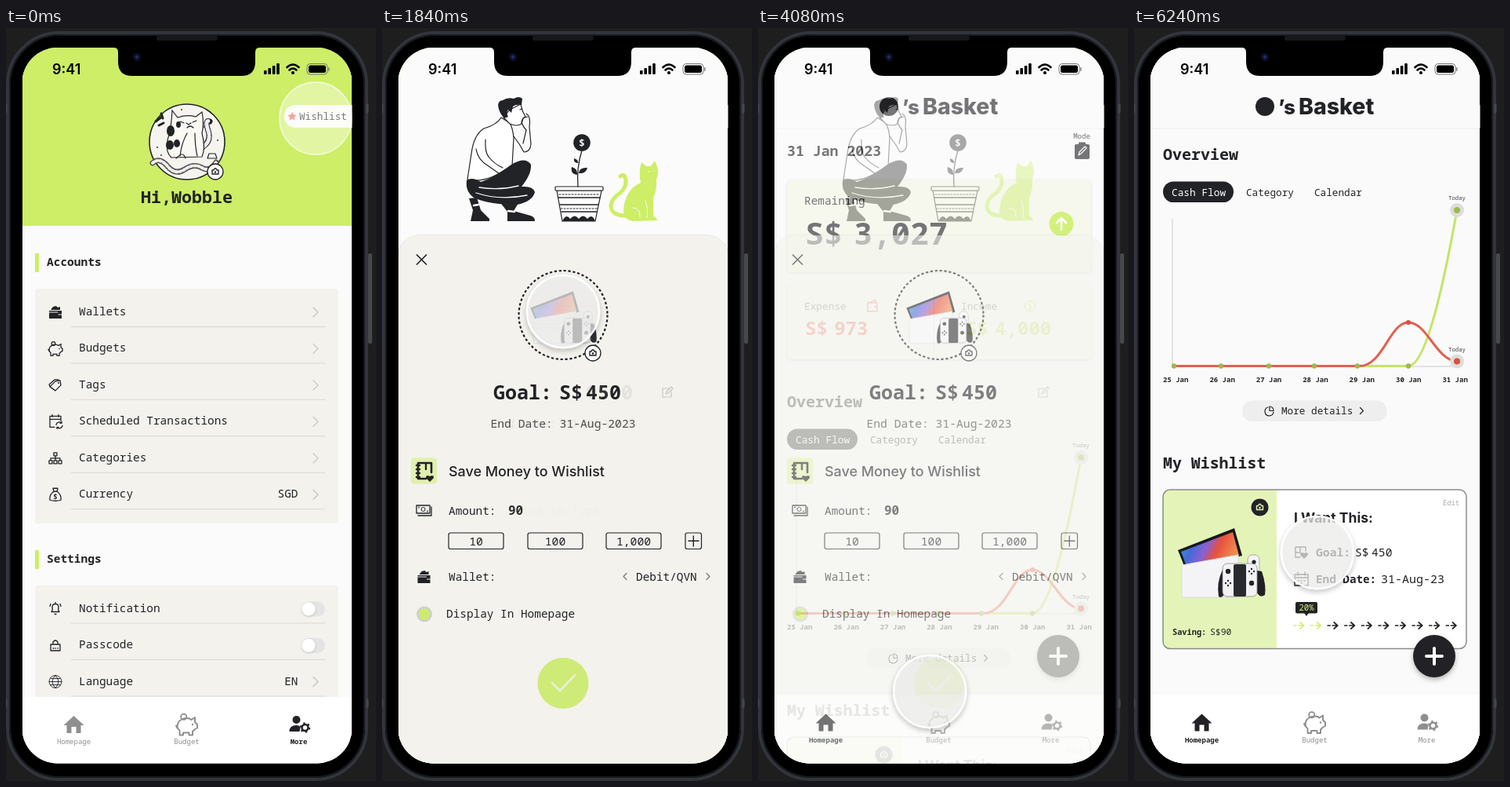
Write an HTML page that moves like this. It is 472 px wide and 959 px high and loops after 6.32 s.

```html
<!DOCTYPE html>
<html lang="en">
<head>
<meta charset="utf-8">
<title>Wishlist flow</title>
<style>
html,body{margin:0;width:100%;height:100%;overflow:hidden;background:#1e1e1f}
svg{display:block;width:472px;height:959px}
text{font-family:"Noto Sans Mono","Liberation Mono",monospace;white-space:pre}
.sans{font-family:Inter,"Open Sans",sans-serif}
</style>
</head>
<body>
<svg id="stage" viewBox="0 0 472 959" xmlns="http://www.w3.org/2000/svg"></svg>
<script>
const INK = '#222326', LIME = '#cdee66', PAPER = '#f3f2ec', GREY = '#8f8f8f';

// drawing helpers
const text = (x, y, s, size, {w = 400, c = INK, a = 'start', cls = ''} = {}) =>
  `<text x="${x}" y="${y}" font-size="${size}" font-weight="${w}" fill="${c}" text-anchor="${a}" class="${cls}">${s}</text>`;
const rect = (x, y, w, h, fill, r = 0, more = '') =>
  `<rect x="${x}" y="${y}" width="${w}" height="${h}" rx="${r}" fill="${fill}" ${more}/>`;
const dot = (x, y, r, fill, more = '') =>
  `<circle cx="${x}" cy="${y}" r="${r}" fill="${fill}" ${more}/>`;
const line = (d, c = INK, w = 1.3, more = '') =>
  `<path d="${d}" fill="none" stroke="${c}" stroke-width="${w}" stroke-linecap="round" stroke-linejoin="round" ${more}/>`;
const fill = (d, c = INK, more = '') => `<path d="${d}" fill="${c}" ${more}/>`;
const at = (x, y, body, s = 1) => `<g transform="translate(${x} ${y}) scale(${s})">${body}</g>`;
const layer = (id, body) => `<g id="${id}">${body}</g>`;
const chevron = (x, y, c, dir = 1, h = 6) => line(`M${x} ${y - h}l${dir * h} ${h}l${-dir * h} ${h}`, c, 1.2);

// icons, centred on 0,0
const walletIcon = fill('M-8-2H8V8H-8ZM-6-3L-3-7L1-8L3-6L6-7V-3Z') + line('M-8 0H3M4 3H8', '#eee', 1);
const pig = c => line('M-7-2C-4-6 2-6 4-4L7-6V-2L9 0V3L7 4L5 6V9H2V7H-3V9H-6V5C-9 3-8 0-7-2M-9 1L-8 3', c, 1.3) +
  dot(-2.5, -6.5, 2.4, 'none', `stroke="${c}" stroke-width="1.2"`) + dot(5, 0, .8, c);
const cam = c => line('M-4-2H-2L-1-4H1L2-2H4V3H-4Z', c, 1.4) + dot(0, .5, 1.2, c);
const camBadge = (x, y) => at(x, y, dot(0, 0, 10, '#fafafa', `stroke="${INK}" stroke-width="1.3"`) + cam(INK));
const icons = [
  walletIcon, pig(INK),
  line('M-7 2L0-5L6-6L7 0L0 7ZM-7 2L-8-1L-1-7L4-7') + dot(4, -3, 1, INK),
  line('M7-1V-7H-7V7H-1M-7-3H7M-4-9V-6M4-9V-6M1 4A4 4 0 0 1 8 2M9 5A4 4 0 0 1 2 7M8-0V2H6M2 9V7H4'),
  line('M-2-7H2V-3H-2ZM0-3V0M-6 3V0H6V3M-8 3H-4V7H-8ZM-2 3H2V7H-2ZM4 3H8V7H4ZM0 0V3'),
  line('M-3-8H3L2-4Q8 0 7 7Q0 9-7 7Q-8 0-2-4ZM-2-4H2') + text(0, 6, '$', 9, {w: 700, a: 'middle'}),
  line('M-5 4Q-3 2-4-2Q-4-6 0-6Q4-6 4-2Q3 2 5 4ZM-1 7H1M-7-3L-6-6M7-3L6-6M0-6V-8'),
  line('M-6-1H6V7H-6ZM-3-1V-4Q0-8 3-4V-1M-3 4H-2M0 4H.5M3 4H3.5'),
  line('M-8 0A8 8 0 1 0 8 0A8 8 0 1 0-8 0H8M0-8Q-8 0 0 8Q8 0 0-8M-6-4H6M-6 4H6', INK, .9)
];

function tabBar(y, active) {
  const tint = i => i === active ? INK : GREY;
  const shapes = [
    fill('M-13 1L0-11L13 1H9V11H3V3H-3V11H-9V1Z', tint(0)),
    at(0, 0, pig(GREY), 1.5),
    dot(-3, -6, 5, tint(2)) + fill('M-12 9Q-12 1-3 1Q1 1 2 4L1 9Z', tint(2)) +
      dot(8, 4, 4, 'none', `stroke="${tint(2)}" stroke-width="2.6"`) +
      dot(8, 4, 5.8, 'none', `stroke="${tint(2)}" stroke-width="2" stroke-dasharray="2.4 3.67"`)
  ];
  return rect(21, y, 420, 100, '#fff') + ['Homepage', 'Budget', 'More'].map((s, i) => {
    const x = [86.5, 230.5, 373.5][i];
    return at(x, y + 35, shapes[i]) +
      text(x, y + 60, s, 9, {w: i === active ? 700 : 400, c: tint(i), a: 'middle'});
  }).join('');
}

// profile page
function avatar() {
  const spots = [[210, 131, 5, 7], [209, 149, 5, 6], [218, 147, 4, 5], [220, 123, 3, 4]];
  const rug = 'M187 172Q196 164 206 176T228 180T250 178T268 171', tail = 'M247 154Q263 146 258 131Q253 116 260 119';
  return dot(231, 145, 48, '#f6f4ee', `stroke="${INK}" stroke-width="1.6"`) +
    line('M191 119l8-6M195 124l6-3M198 109l2 6', INK, 3) +
    line(rug, '#555', 7) + line(rug, '#eee', 4, 'stroke-dasharray="2 3"') +
    line(tail, INK, 7) + line(tail, '#eee', 5, 'stroke-dasharray="2 2"') +
    fill('M212 105L219 114Q231 110 242 113L250 107Q253 122 250 134Q255 153 250 164L211 165Q203 158 206 143Q211 128 212 105Z', '#fbf9f4', `stroke="${INK}" stroke-width="1.2"`) +
    spots.map(([x, y, a, b]) => `<ellipse cx="${x}" cy="${y}" rx="${a}" ry="${b}" fill="${INK}"/>`).join('') +
    line('M222 119l5 2M238 120l5-2M230 121l3 2l3-2M231 127Q235 123 239 127M222 163Q224 146 231 134M241 134Q241 150 244 163M217 166Q226 156 229 166M257 166L259 160H267L269 166Z', INK, 1.2) +
    [[193, 152], [198, 162], [252, 126], [270, 143], [224, 104]].map(p => dot(...p, .9, INK)).join('') +
    camBadge(267, 183);
}

function profilePage() {
  const head = (y, s) => rect(37, y - 11, 5, 24, LIME) + text(52, y + 5, s, 14.5, {w: 600});
  const row = (s, y, i) => at(63, y + 1, icons[i]) + text(93, y + 5, s, 14.4, {w: 300}) +
    line(`M83 ${y + 19.5}H407`, '#d9d9d5', 1);
  const more = y => chevron(392, y + 1, '#c3c3c0');
  const value = (s, y) => text(372.5, y + 5, s, 14.4, {w: 300, a: 'end'});
  const toggle = y => rect(377, y - 8, 30, 19, '#e4e4e4', 9.5) + dot(386, y + 1.5, 8.5, '#fff', 'filter="url(#soft)"');
  const top = ['Wallets', 'Budgets', 'Tags', 'Scheduled Transactions', 'Categories', 'Currency'];
  const low = ['Notification', 'Passcode', 'Language'];
  return rect(21, 25, 420, 912, '#fbfbfb') + rect(21, 25, 420, 227, LIME) + avatar() +
    text(230.5, 223, 'Hi,Wobble', 21.7, {w: 600, a: 'middle'}) +
    rect(355, 98, 100, 29, '#f7f7f2', 14) +
    fill('M365 107l1.6 3.6l4 .4l-3 2.7l.9 3.9l-3.5-2l-3.5 2l.9-3.9l-3-2.7l4-.4Z', '#f2644c') +
    text(374, 117, 'Wishlist', 12.7, {w: 500}) +
    head(298, 'Accounts') + rect(37, 332, 387, 299, PAPER, 4) +
    top.map((s, i) => row(s, 361 + i * 46.45, i) + more(361 + i * 46.45)).join('') + value('SGD', 593) +
    head(676, 'Settings') + rect(37, 710, 387, 180, PAPER, 4) +
    low.map((s, i) => row(s, 738.5 + i * 46.5, i + 6)).join('') +
    toggle(738.5) + toggle(785) + value('EN', 831.5) + more(831.5);
}

// wishlist page: drawing behind, form sheet in front
function scene() {
  const edge = `stroke="${INK}" stroke-width="1.2"`;
  const man =
    fill('M152 114Q147 123 130 128Q117 136 114 160L109 193Q128 197 148 186L166 176L168 140Q167 128 163 121Z', '#fff', edge) +
    fill('M163 104L177 97L179 105L183 113L180 115L178 122Q172 126 163 122L155 114Z', '#fff', edge) +
    fill('M148 98Q149 92 154 92Q160 88 168 90Q175 86 179 90L178 98Q170 97 167 100L165 108L161 104Q158 108 161 113L156 115Q149 108 148 98Z') +
    line('M176 104l3-1M168 138Q176 148 181 158Q189 158 190 148L188 126Q190 112 184 109M186 113Q178 114 178 120Q180 126 184 130L180 147', INK, 1.2) +
    line('M132 142Q131 158 136 164Q143 173 154 178M120 154Q122 168 136 176L156 190L165 186', INK, 1.2) +
    fill('M108 194Q115 189 126 196Q140 192 165 174Q183 163 190 174Q191 186 178 202Q193 201 195 209Q192 221 172 225Q136 225 117 216Q106 208 108 194Z') +
    line('M124 203Q150 207 174 201M120 210Q150 220 185 213', '#fafafa', 1.3) +
    fill('M111 217L121 216L126 232L137 243V246H113L116 232Z') +
    fill('M149 220L174 223L168 233L186 238Q196 240 195 246H160V234Z') +
    line('M117 226l6-1M161 233l8 1', '#fff', 2.5);
  const pot = fill('M223 207H280L272 246H230Z', '#fff', edge) + rect(221, 202, 61, 5, '#fff', 1, edge) +
    line('M225 216H278M227 225H276M229 234H274', INK, 1.6) +
    line('M226 212H277M228 230H275', INK, 1, 'stroke-dasharray="2 2"') +
    fill('M230 246Q235 236 240 243Q246 236 251 243Q257 236 262 243Q268 236 272 246Z') +
    line('M250 202Q248 178 255 156', INK, 1.3) +
    fill('M249 187Q240 186 242 177Q250 179 249 187M251 185Q252 177 262 178Q260 186 251 185M250 172Q244 172 245 166Q251 168 250 172') +
    dot(255, 146, 10.8, INK) + text(255, 151, '$', 13, {w: 600, c: '#fff', a: 'middle'});
  const cat = line('M314 239Q292 240 292 226Q293 217 304 210Q314 200 310 190Q308 185 304 189', LIME, 5) +
    fill('M331 171L337 176H343L348 169Q355 182 350 193Q351 206 346 216V240Q351 241 351 245L320 246Q308 244 308 232Q310 206 330 197Q327 184 331 171Z', LIME) +
    line('M340 183h1M347 182h.5M336 220Q340 230 338 242M320 229Q330 229 329 241', '#fbfbfb', 1);
  return rect(21, 25, 420, 912, '#fbfbfb') + man + pot + cat;
}

const consoleArt = fill('M56 665L128 637L138 672L66 690Z', '#17181c') +
  fill('M60 667L126 642L134 672L68 688Z', 'url(#screen)') +
  fill('M61 684L133 671V725H61Z', '#f4f4f6', 'stroke="#dadade"') +
  rect(145, 671, 15, 27, '#f4f4f6', 6, 'stroke="#aaa"') +
  fill('M113 690Q105 706 108 724Q114 728 118 714ZM151 690L163 692Q169 710 167 722Q158 728 155 712Z', '#202126') +
  rect(113, 682, 44, 42, '#f2f2f3', 6, 'stroke="#888" stroke-width=".8"') + rect(127, 683, 16, 41, '#292a2e', 2) +
  dot(120, 692, 3.2, INK) + dot(150, 707, 3.2, INK) + dot(153, 680, 2.6, INK) +
  [[117, 707], [123, 707], [120, 704], [120, 710], [147, 692], [153, 692], [150, 689], [150, 695]].map(p => dot(...p, 1.2, INK)).join('');

function form(done) {
  const bank = 'Debit/QVN', thin = {w: 300}, mid = {w: 300, a: 'middle'}, bold = {w: 800};
  const sign = rect(188, 354, 84, 28, '#f3f3f1', 1, `stroke="${INK}" stroke-width="1"`) +
    line('M214 354L236 331L249 354M189 359Q210 355 238 360T270 358M190 376Q215 380 240 374T271 377M192 364H205M258 371H269', INK, .8) +
    text(231, 370, 'My Wishlist', 7.3, {a: 'middle'});
  const chip = (x, s) => rect(x, 643, 70, 20.5, 'none', 2.5, `stroke="${INK}" stroke-width="1.2"`) + text(x + 35, 658.5, s, 14.7, mid);
  return rect(21, 264, 420, 720, PAPER, 27, 'filter="url(#soft)"') +
    line('M44.5 289l12 12M56.5 289l-12 12', INK, 1.7) +
    dot(231, 365.5, 56.5, done ? PAPER : '#f6f6f5', `stroke="${INK}" stroke-width="2.2" stroke-dasharray="3.2 2.72"`) +
    (done ? at(147, -147, consoleArt, .757) : sign) + camBadge(269, 414) +
    text(142, 473, 'Goal:', 25, bold) + text(226, 473, 'S$', 25, bold) +
    text(260, 473, done ? '450' : '0.00', 25, bold) +
    line('M366 459H358V470H369V463M362 466L363 463L369 457L371 459L365 465Z', '#c9c9c5', 1.2) +
    text(231, 509, 'End Date: ' + (done ? '31-Aug-2023' : 'DD-MM-YYYY'), 14.7, {w: 300, c: '#444', a: 'middle'}) +
    rect(37, 547.5, 33, 33, '#e2f1ae', 4) +
    line('M46 554H63V566M46 554V574H56', INK, 2.6) + line('M44 557h4M44 562h4M44 567h4M44 572h4M56 555v7', INK, 2.4) +
    fill('M61 578l-5-5q0-5 5-2q5-3 5 2Z') +
    text(85, 571, 'Save Money to Wishlist', 17.9, {w: 500, cls: 'sans'}) +
    line('M44 608H61V618H44ZM63 610V621H46M47 610v1M58 615v1', INK, 1.3) + dot(52.5, 613, 2.5, 'none', `stroke="${INK}"`) +
    text(85, 620, 'Amount:', 14.4, thin) +
    (done ? text(161, 620, '90', 16, {w: 600}) : text(161, 620, 'Click to Type', 15, {w: 300, c: '#bdbdb8'})) +
    chip(85, '10') + chip(186, '100') + chip(286, '1,000') +
    rect(387, 643, 20.5, 20.5, 'none', 2.5, `stroke="${INK}" stroke-width="1.2"`) + line('M391 653.3H404M397.3 647V660', INK, 1.4) +
    at(53.5, 699, walletIcon) + text(85, 704, 'Wallet:', 14.4, thin) +
    chevron(312, 698.5, '#777', -1, 4) + text(324, 703.5, bank, 14.4, thin) + chevron(414, 698.5, '#777', 1, 4) +
    dot(54, 746.5, 10, '#cecece') + (done ? dot(54, 746.5, 7.3, LIME) : '') +
    text(82, 751, 'Display In Homepage', 14.4, thin) +
    dot(231, 834.5, 32.5, done ? '#cdec70' : '#dcdcd8') +
    line('M217 834L227 844L246 824', done ? '#f2f7dc' : '#858582', 2.6);
}

// home page; scrolled content uses its resting coordinates, 315 px above the start
function chart() {
  const days = [51, 111, 172, 230, 285, 350];
  const end = (x, y, c) => dot(x, y, 9, '#dddddb') + dot(x, y, 4, c) + text(x, y - 13, 'Today', 7.3, {a: 'middle', c: '#444'});
  return line('M49 244V431H417', '#e3e3e3', 2) +
    line('M51 430.5H350C374 430 398 310 412 232', '#c5e467', 3) +
    line('M51 430.5H288C318 430 326 375 350 375S385 423 412 424.5', '#e2604f', 3) +
    days.map(x => dot(x, 430.5, 3.2, '#9cba4e')).join('') + dot(350, 375, 3, '#dc4f40') +
    end(412, 232, '#9cba4e') + end(412, 424.5, '#dc4f40') +
    days.concat(0).map((_, i) => text(37 + i * 59.4, 451, `${25 + i} Jan`, 9, {w: 600})).join('');
}

function balance() {
  const sum = (x, y, s, size, c) => text(x, y, 'S$', size, {w: 700, c}) + text(x + size * 1.55, y, s, size, {w: 700, c});
  const red = '#ef7468', green = '#cbe376';
  return text(37, 163, '31 Jan 2023', 18.2, {w: 600}) + text(413, 141, 'Mode', 9, {a: 'middle'}) +
    rect(404, 148, 19, 19, INK, 2) + rect(409, 145.5, 9, 4, INK, 1) + line('M409 162l1-4l7-7l2 2l-7 7Z', '#fff', 1.2) +
    rect(37, 193, 388, 118, '#f2f5e4', 5, 'filter="url(#soft)"') + text(59, 225, 'Remaining', 14.4) +
    sum(60, 276, '3,027', 40) + dot(387, 249.5, 15.5, '#b9ea2e') + line('M387 257V243M381 248L387 242L393 248', '#fff', 2.6) +
    rect(37, 325, 388, 97, '#f8f9f4', 5, 'filter="url(#soft)"') + line('M224.5 332V414', '#ddd', 1) +
    text(59, 359, 'Expense', 12.8, {c: '#777'}) + line('M140 350H152V361H140ZM142 350L150 346V350M148 355H152', red, 1.3) +
    sum(60, 391, '973', 24, red) +
    text(259, 359, 'Income', 12.8, {c: '#777'}) + dot(347, 354, 6.5, 'none', `stroke="${green}" stroke-width="1.3"`) +
    text(347, 358, '$', 10, {c: green, a: 'middle'}) + sum(265, 391, '4,000', 24, green);
}

function wishCard() {
  const bold = {w: 600};
  const arrows = Array.from({length: 10}, (_, i) =>
    line(`M${204 + i * 21.6} 761h3m3 0h6m-4-4l4.5 4l-4.5 4`, i < 2 ? '#d3ee7c' : INK, 1.7)).join('');
  return text(37, 561, 'My Wishlist', 19.9, bold) +
    rect(37, 588, 387, 202.5, '#fff', 9) + fill('M182 588H46Q37 588 37 597V781Q37 790.5 46 790.5H182Z', '#e4f4b8') +
    rect(37, 588, 387, 202.5, 'none', 9, 'stroke="#8b8b88" stroke-width="1.5"') +
    at(160.5, 610.5, dot(0, 0, 11, INK) + cam('#e4f4b8')) + consoleArt +
    text(49, 773, 'Saving:', 10.3, bold) + text(97, 773, 'S$90', 11.4, {w: 500}) +
    text(394, 608, 'Edit', 8.8, {c: '#aaa'}) + text(204, 630, 'I Want This:', 17.5, {w: 700, cls: 'sans'}) +
    line('M206 661H219V666M206 661V674H212M212 661V668M206 668H212', INK, 1.4) + fill('M217 676l-5-5q0-5 5-2q5-3 5 2Z') +
    text(232, 673, 'Goal:', 14.7, bold) + text(282, 673, 'S$', 14.7) + text(303, 673, '450', 14.7) +
    line('M205 696H222V710H205ZM205 700H222M209 693V697M218 693V697M209 704h1M213 704h1M217 704h1M209 707h1M213 707h1', INK, 1.4) +
    text(232, 707, 'End Date:', 14.3, bold) + text(315, 707, '31-Aug-23', 15) +
    rect(206, 731, 28, 14.5, INK, 2) + fill('M217 745L220 749L223 745Z') +
    text(220, 742, '20%', 10.6, {c: '#d9f188', a: 'middle'}) + arrows;
}

function homePage() {
  const content = at(0, -315, balance()) + text(37, 168, 'Overview', 20, {w: 600}) +
    rect(37, 195.5, 90, 26.5, INK, 13.2) + text(48, 213.5, 'Cash Flow', 12.8, {w: 500, c: '#fff'}) +
    text(143, 213.5, 'Category', 12.7, {w: 300}) + text(230, 213.5, 'Calendar', 12.7, {w: 300}) + chart() +
    rect(138, 474.5, 184.5, 26.5, '#eeeeee', 13) + line('M171 483A5.5 5.5 0 1 0 178 489M173 482V487.5H178A5 5 0 0 0 173 482', INK, 1.2) +
    text(188, 492, 'More details', 12.7, {w: 300}) + chevron(288.5, 487.5, INK, 1, 4) + wishCard();
  return rect(21, 25, 420, 912, '#fafafa') + layer('scroll', content) +
    rect(21, 25, 420, 103, '#fafafa') + line('M21 128H441', '#ececec', 1) +
    dot(167, 100, 12, INK) + text(184, 110, '’s', 26, {w: 800, cls: 'sans'}) + text(210, 110, 'Basket', 28.5, {w: 800, cls: 'sans'}) +
    dot(383, 800, 27, INK, 'filter="url(#drop)"') + line('M373 800H393M383 790V810', '#fff', 4);
}

function phone() {
  return rect(0, 0, 472, 959, '#1e1e1f') + rect(462, 287, 5, 115, '#47484b', 2) +
    rect(2, 6, 458, 951, '#000', 66, 'stroke="#32353b" stroke-width="4"') +
    rect(5, 9, 452, 945, 'none', 63, 'stroke="#191b1f" stroke-width="2"') +
    line('M0 98V107M0 856V864M461 98V107M461 856V864', '#45484d', 3);
}

function overlay() {
  const bars = [5, 8, 11, 14].map((h, i) => rect(329 + i * 5.4, 59 - h, 3.6, h, '#000', 1)).join('');
  return fill('M138 25Q143 25 143 31V43Q143 61 161 61H300Q318 61 318 43V31Q318 25 323 25Z', '#000') +
    rect(192, 10, 78, 6, '#17181b', 3) + dot(167, 37, 5.5, '#0a0d1c') + dot(167, 37, 2.4, '#1c2a62') +
    text(59, 59, '9:41', 18, {w: 600, c: '#000', cls: 'sans'}) + bars +
    line('M358.5 50Q366 43 373.5 50M361.5 53.5Q366 49.5 370.5 53.5', '#000', 2.6) + dot(366, 57, 2.1, '#000') +
    rect(384, 45.5, 26, 13.5, 'none', 4, 'stroke="#777" stroke-width="1"') + rect(386, 47.5, 22, 9.5, '#000', 2.5) +
    rect(411, 50, 1.6, 5, '#888', 1);
}

const stage = document.getElementById('stage');
stage.innerHTML = `<defs>
  <clipPath id="glass">${rect(20.5, 25, 421, 911.5, '#000', 45)}</clipPath>
  <filter id="soft" x="-20%" y="-20%" width="140%" height="140%"><feDropShadow dx="0" dy="1" stdDeviation="1.6" flood-opacity=".2"/></filter>
  <filter id="drop" x="-30%" y="-30%" width="160%" height="160%"><feDropShadow dx="0" dy="3" stdDeviation="3" flood-opacity=".28"/></filter>
  <linearGradient id="screen" y2=".3"><stop stop-color="#35a4c9"/><stop offset=".3" stop-color="#4569d8"/>
    <stop offset=".52" stop-color="#8c60ce"/><stop offset=".7" stop-color="#e7503e"/><stop offset="1" stop-color="#f08a50"/></linearGradient>
</defs>${phone()}
<g clip-path="url(#glass)">
  ${profilePage()}
  ${layer('scene', scene())}
  ${layer('home', homePage())}
  ${layer('sheet', form(false) + layer('filled', form(true)))}
  ${layer('profileTabs', tabBar(852, 2))}
  ${layer('homeTabs', tabBar(849.5, 0))}
  ${layer('touch',
    layer('faint', dot(0, 0, 46, '#fff', 'fill-opacity=".4" stroke="#fff" stroke-opacity=".65" stroke-width="1.8"')) +
    layer('solid', dot(0, 0, 46, '#f3f3f2', 'fill-opacity=".68" stroke="#fff" stroke-opacity=".95" stroke-width="2.4" filter="url(#drop)"')))}
</g>${overlay()}`;

const LOOP = 6320, STEP = 80, FADE = 300;
const OPEN = 80, FILL = 1600, LEAVE = 3950, SCROLL = 4600;
const part = id => document.getElementById(id);
const show = (id, v) => { part(id).style.opacity = v; };
const clamp = v => Math.min(1, Math.max(0, v));
const easeOut = p => 1 - (1 - p) ** 1.7;
const easeBoth = p => p * p * (3 - 2 * p);
const run = (t, start, dur = FADE) => clamp((t - start) / dur);

// finger path: start, duration, x, y, easing
const moves = [
  [740, 540, 231, 361, easeBoth],
  [2600, 460, 200, 858, easeBoth],
  [LEAVE, FADE, 231, 837, easeOut],
  [SCROLL, 400, 234, 668, easeBoth]
];

function finger(t) {
  let x = 395, y = 115;
  for (const [start, dur, tx, ty, ease] of moves) {
    const p = ease(run(t, start, dur));
    x += (tx - x) * p;
    y += (ty - y) * p;
  }
  return [x, y];
}

function draw() {
  const t = Math.floor(performance.now() % LOOP / STEP) * STEP;
  const opened = easeOut(run(t, OPEN)), left = easeOut(run(t, LEAVE));
  show('scene', opened);
  show('solid', opened);
  show('faint', 1 - opened);
  show('profileTabs', 1 - opened);
  show('filled', easeOut(run(t, FILL)));
  show('sheet', opened * (1 - run(t, LEAVE)));
  show('home', left);
  show('homeTabs', left);
  const rest = 1 - easeBoth(run(t, SCROLL, 400));
  part('scroll').setAttribute('transform', `translate(0 ${315 * rest})`);
  part('touch').setAttribute('transform', `translate(${finger(t).join(' ')})`);
  requestAnimationFrame(draw);
}
draw();
</script>
</body>
</html>
```
